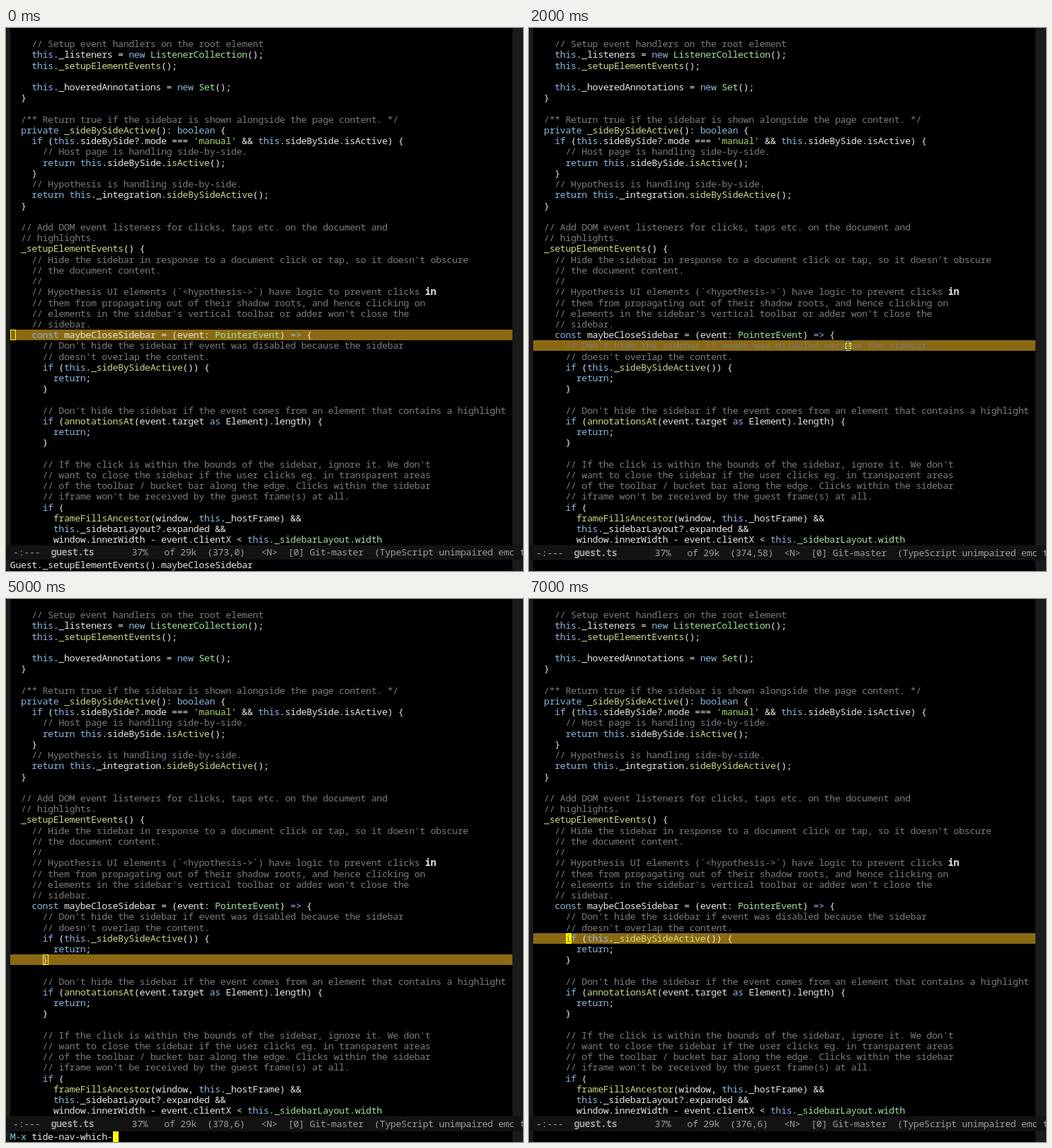
An HTML page with a canvas that plays this animation: 730x767 px, repeating every 8 s.

```html
<!DOCTYPE html>
<html lang="en">
<head>
<meta charset="utf-8">
<title>Editor session</title>
<style>
  html, body { margin: 0; height: 100%; overflow: hidden; background: #000; }
  canvas { display: block; }
</style>
</head>
<body>
<canvas id="stage" width="730" height="767"></canvas>
<script type="text/plain" id="source">
    // Setup event handlers on the root element
    this._listeners = new ListenerCollection();
    this._setupElementEvents();

    this._hoveredAnnotations = new Set();
  }

  /** Return true if the sidebar is shown alongside the page content. */
  private _sideBySideActive(): boolean {
    if (this.sideBySide?.mode === 'manual' && this.sideBySide.isActive) {
      // Host page is handling side-by-side.
      return this.sideBySide.isActive();
    }
    // Hypothesis is handling side-by-side.
    return this._integration.sideBySideActive();
  }

  // Add DOM event listeners for clicks, taps etc. on the document and
  // highlights.
  _setupElementEvents() {
    // Hide the sidebar in response to a document click or tap, so it doesn't obscure
    // the document content.
    //
    // Hypothesis UI elements (`<hypothesis->`) have logic to prevent clicks in
    // them from propagating out of their shadow roots, and hence clicking on
    // elements in the sidebar's vertical toolbar or adder won't close the
    // sidebar.
    const maybeCloseSidebar = (event: PointerEvent) => {
      // Don't hide the sidebar if event was disabled because the sidebar
      // doesn't overlap the content.
      if (this._sideBySideActive()) {
        return;
      }

      // Don't hide the sidebar if the event comes from an element that contains a highlight
      if (annotationsAt(event.target as Element).length) {
        return;
      }

      // If the click is within the bounds of the sidebar, ignore it. We don't
      // want to close the sidebar if the user clicks eg. in transparent areas
      // of the toolbar / bucket bar along the edge. Clicks within the sidebar
      // iframe won't be received by the guest frame(s) at all.
      if (
        frameFillsAncestor(window, this._hostFrame) &&
        this._sidebarLayout?.expanded &&
        window.innerWidth - event.clientX < this._sidebarLayout.width
</script>
<script>
const ctx = document.getElementById('stage').getContext('2d');
// The newline after the tag makes row 0 blank, so code starts on row 1.
const lines = document.getElementById('source').textContent.trimEnd().split('\n');

const CELL = 7.61, ROW = 15.22, LEFT = 6, RIGHT = 715, MODE_TOP = 730.5;
const FONT = '13.3px "Noto Sans Mono", "DejaVu Sans Mono", monospace';
const color = {
  text: '#e6e6e2', comment: '#7c7c7c', keyword: '#8fb4dc', call: '#cbd88a',
  type: '#a3e0a0', string: '#a8d468', line: '#8b6914', cursor: '#ffff00',
  fringe: '#1a1a1a', mode: '#131313', modeText: '#9c9c9c', prompt: '#8fcfe0'
};
const keywords = /^(this|new|private|boolean|if|return|const|as|=>)$/;
const types = /^(ListenerCollection|Set|PointerEvent|\.\w.*)$/;
const tokens = /\/[/*].*|'[^']*'|=>|(?<=< this)[.\w]+|\w+|[^\w\s]/g;

// Each state lasts one second.
const named = 'Guest._setupElementEvents().maybeCloseSidebar';
const idle = { row: 28, col: 0, pos: '(373,0)', echo: named, lift: 1 };
const typing = echo => ({ row: 33, col: 6, hollow: true, pos: '(378,6)', prompt: 'M-x ', echo });
const states = [
  { ...idle, hollow: true },
  idle,
  { row: 29, col: 58, pos: '(374,58)', pointer: true },
  { ...typing(''), pointer: true },
  typing('tide-na'),
  typing('tide-nav-which-'),
  typing('tide-nav-which-function'),
  { row: 31, col: 6, pos: '(376,6)' }
];

const baseline = row => Math.round(row * ROW + 12);

function rect(x, y, w, h, fill) {
  ctx.fillStyle = fill;
  ctx.fillRect(x, y, w, h);
}

function text(str, x, y, fill, bold) {
  ctx.font = (bold ? 'bold ' : '') + FONT;
  ctx.fillStyle = fill;
  [...str].forEach((ch, i) => {
    if (ch !== ' ') ctx.fillText(ch, x + (i + 0.5) * CELL, y);
  });
}

function tokenColor(token, rest) {
  if (/^\/[/*]/.test(token)) return color.comment;
  if (token[0] === "'") return color.string;
  if (keywords.test(token)) return color.keyword;
  if (types.test(token)) return color.type;
  return /^\w/.test(token) && rest[0] === '(' ? color.call : color.text;
}

function drawLine(line, row) {
  const y = baseline(row);
  for (const m of line.matchAll(tokens)) {
    const token = m[0], x = LEFT + m.index * CELL;
    const tail = token.endsWith('clicks in') ? 2 : 0;
    const body = token.slice(0, token.length - tail);
    text(body, x, y, tokenColor(token, line.slice(m.index + token.length)));
    if (tail) text('in', x + body.length * CELL, y, color.text, true);
  }
}

function drawCursor({ row, col, hollow }) {
  const x = Math.round(LEFT + col * CELL), y = Math.round(row * ROW);
  if (hollow) {
    ctx.strokeStyle = color.cursor;
    ctx.strokeRect(x + 0.5, y + 0.5, 7, 14);
  } else {
    rect(x, y, 8, 15, color.cursor);
    text(lines[row][col], LEFT + col * CELL, baseline(row), color.line);
  }
}

function drawPointer(x, y) {
  const bars = [[-3, -7, 3, 1], [1, -7, 3, 1], [0, -6, 1, 12], [-3, 6, 3, 1], [1, 6, 3, 1]];
  for (const [dx, dy, w, h] of bars) rect(x + dx - 1, y + dy - 1, w + 2, h + 2, '#222');
  for (const [dx, dy, w, h] of bars) rect(x + dx, y + dy, w, h, '#eee');
}

function drawModeLine(pos, lift) {
  rect(0, MODE_TOP, 730, 21.5 - lift, color.mode);
  const put = (col, str, bold) => text(str, 10.3 + col * CELL, 746 - lift, color.modeText, bold);
  put(0, '-:---');
  put(7, 'guest.ts', true);
  put(22, '37%   of 29k');
  put(36, pos);
  put(46, '<N>  [0] Git-master  (TypeScript unimpaired emc t');
}

function drawEcho({ prompt = '', echo = '' }, lift) {
  const x = LEFT + prompt.length * CELL;
  text(prompt, LEFT, 764 - lift, color.prompt);
  text(echo, x, 764 - lift, color.text);
  if (prompt) rect(Math.round(x + echo.length * CELL), 752, 8, 15, color.cursor);
}

function draw(state) {
  const lift = state.lift || 0;
  rect(0, 0, 730, 767, '#000');
  rect(0, 0, LEFT, 767, color.fringe);
  rect(RIGHT, 0, 15, 767, color.fringe);
  rect(LEFT, Math.round(state.row * ROW), RIGHT - LEFT, 15, color.line);
  lines.forEach(drawLine);
  drawCursor(state);
  if (state.pointer) drawPointer(450, 449);
  drawModeLine(state.pos, lift);
  drawEcho(state, lift);
}

ctx.textAlign = 'center';
function tick() {
  draw(states[Math.floor(performance.now() / 1000) % states.length]);
  requestAnimationFrame(tick);
}
tick();
</script>
</body>
</html>
```
